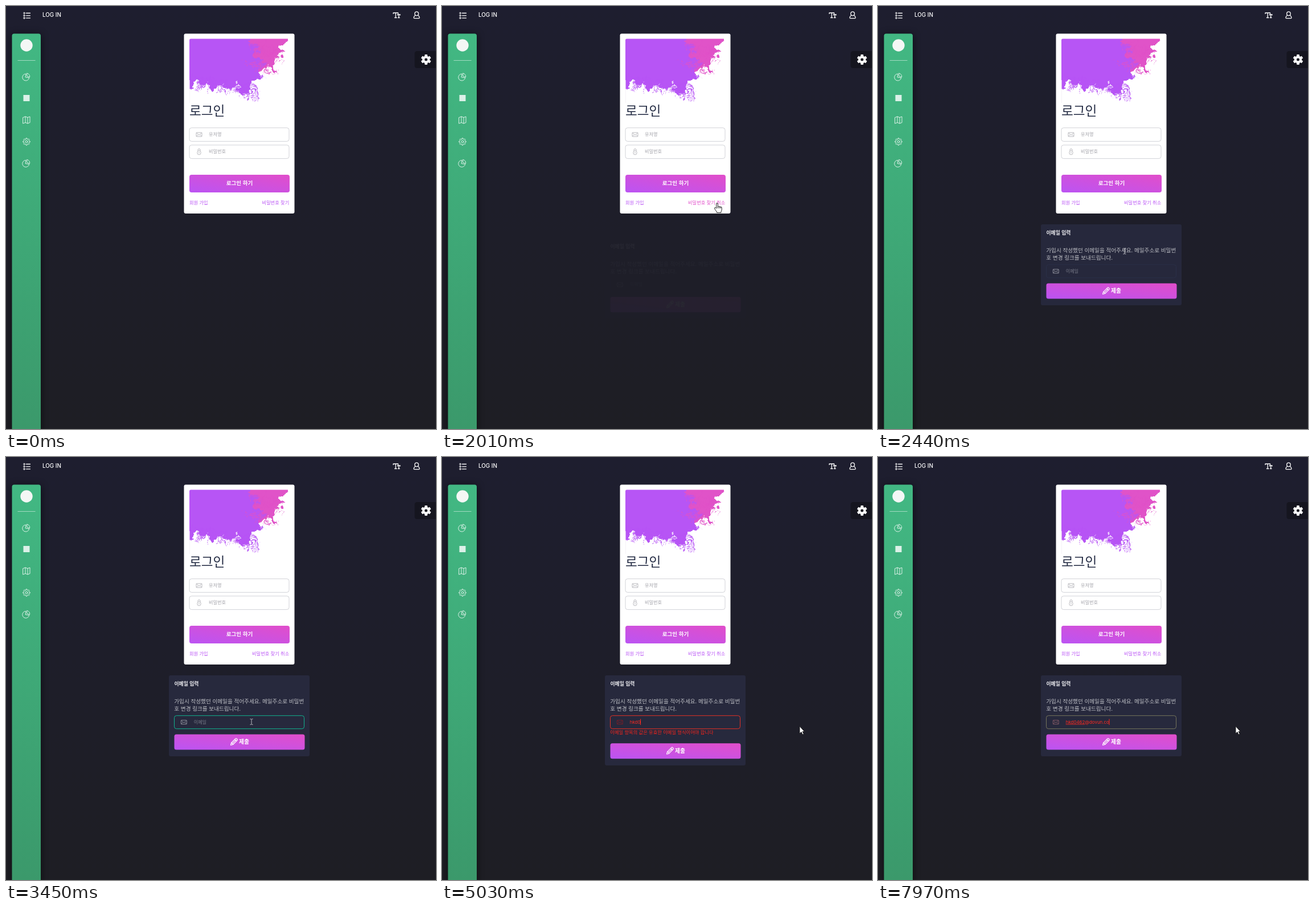
Recreate the animation shown at these times as an HTML page. Size 755 by 742 pixels, loop 8000 ms.

```html
<!DOCTYPE html>
<html lang="ko">
<head>
<meta charset="utf-8">
<title>로그인</title>
<style>
  html, body { margin: 0; width: 100%; height: 100%; overflow: hidden; background: #1e1e28; }
  svg { display: block; width: 755px; height: 742px; }
  text { font-family: "Noto Sans CJK KR", "Noto Sans CJK", "Noto Sans", sans-serif; font-weight: 300; }
  .latin { font-family: Inter, Roboto, sans-serif; font-weight: 400; }
  .bold { font-weight: 700; fill: #fff; }
  .line { fill: none; stroke: #fff; stroke-linecap: round; stroke-linejoin: round; }
</style>
</head>
<body>
<svg viewBox="0 0 755 742" xmlns="http://www.w3.org/2000/svg">
  <defs>
    <linearGradient id="page" x2="0" y2="1"><stop stop-color="#1e1e2f"/><stop offset="1" stop-color="#1e1e24"/></linearGradient>
    <linearGradient id="green" x2="0" y2="1"><stop stop-color="#42b883"/><stop offset="1" stop-color="#3b996b"/></linearGradient>
    <linearGradient id="primary" x1="1" y1="0" x2="0" y2="1"><stop stop-color="#e14eca"/><stop offset="1" stop-color="#bb54f3"/></linearGradient>
    <filter id="shade" x="-100%" width="300%" y="-10%" height="120%"><feGaussianBlur stdDeviation="7"/></filter>
    <filter id="ragged" filterUnits="userSpaceOnUse" x="290" y="20" width="230" height="170">
      <feTurbulence type="fractalNoise" baseFrequency=".09" numOctaves="4" seed="8"/>
      <feDisplacementMap in="SourceGraphic" scale="22" xChannelSelector="R" yChannelSelector="G"/>
    </filter>
    <clipPath id="picture"><path d="M322 170V60q0-2.5 2.500-2.500H497V170z"/></clipPath>
    <g id="pie" class="line"><path d="M-1-5A6 6 0 1 0 5.200 2L-1 1z"/><path d="M1.500-6A5.500 5.500 0 0 1 6 1L1.500-1z"/></g>
    <g id="mail" fill="none"><rect x="-5" y="-3.500" width="10" height="7" rx=".8"/><path d="M-4.500-3L0 1l4.500-4M-4.500 3l3-3M4.500 3l-3-3"/></g>
  </defs>

  <rect width="755" height="742" fill="url(#page)"/>

  <!-- top bar -->
  <g class="line" stroke-width="1.300">
    <path d="M35.500 12.500h7M35.500 16.800h7M35.500 21.100h7"/>
    <g stroke-width="1"><circle cx="32" cy="12.500" r="1.300"/><circle cx="32" cy="16.800" r="1.300"/><circle cx="32" cy="21.100" r="1.300"/></g>
    <path d="M680 13.500V12h8.500v1.500M684.200 12v8.500M682.500 20.500h3.500M687.500 16v-1h4.500v1M689.700 15v5.500M688.500 20.500h2.500"/>
    <circle cx="721" cy="13.500" r="3.300"/>
    <path d="M718.500 16.500q-2.500 1.500-2.500 4 0 1.200 1.500 1.200h7q1.500 0 1.500-1.200 0-2.500-2.500-4"/>
  </g>
  <text class="latin" x="64" y="19.200" font-size="9.800" fill="#fff" style="font-weight:500">LOG IN</text>

  <!-- sidebar -->
  <rect x="10.500" y="50" width="50.500" height="720" filter="url(#shade)" opacity=".55"/>
  <path d="M10.500 742V52.500q0-4 4-4H57q4 0 4 4V742z" fill="url(#green)"/>
  <circle cx="36" cy="69" r="10.700" fill="#f4f7f5"/>
  <path d="M20.500 95.500h31" stroke="#fff" opacity=".5"/>
  <g opacity=".82">
    <use href="#pie" x="35.500" y="124"/>
    <rect x="30.500" y="156" width="11" height="11" fill="#fff"/>
    <path class="line" d="M30 195.500l4-1.500 4 1.500 4-1.500v10.500l-4 1.500-4-1.500-4 1.500zM34 194v10.500M38 195.500V206"/>
    <g class="line" transform="translate(36 238)"><path id="gearLine"/><circle r="2"/></g>
    <use href="#pie" x="35.500" y="275.500"/>
  </g>

  <!-- settings tab -->
  <path d="M755 79h-33q-4.500 0-4.500 4.500v21q0 4.500 4.500 4.500h33z" fill="#15151f"/>
  <path id="gearSolid" transform="translate(737.500 94)" fill="#fff" fill-rule="evenodd" stroke="#fff" stroke-linejoin="round"/>

  <!-- login card -->
  <rect x="312.500" y="48.500" width="194" height="315.500" rx="3" fill="#fff"/>
  <g clip-path="url(#picture)">
    <g id="ink" filter="url(#ragged)" fill="none" stroke-linecap="round">
      <path fill="#e052c8" d="M405 30H482L495 62 482 74 492 84 470 92 476 118 460 104 442 120 410 95z"/>
      <path fill="#b754f5" d="M280 20H420L424 62 448 74 434 88 456 100 442 112 452 126 428 130 434 150 416 156 406 136 392 148 380 138 366 148 352 132 340 138 331 128 326 146 280 130z"/>
    </g>
  </g>
  <path d="M322.500 130v40" stroke="#eeeaf2" stroke-width=".6"/>
  <text x="322" y="192" font-size="22.600" fill="#222a42" style="font-weight:100">로그인</text>
  <g fill="none" stroke="#d2d3d8">
    <rect x="322" y="213.700" width="175" height="23.700" rx="3.800"/>
    <rect x="322" y="243.900" width="175" height="23.700" rx="3.800"/>
  </g>
  <g stroke="#a8a8ae" stroke-width=".8" fill="none">
    <use href="#mail" x="339" y="225.500"/>
    <path d="M337 254v-1.500a2 2 0 0 1 4 0V254M339 256v2.500"/><ellipse cx="339" cy="257.300" rx="3.200" ry="3.600"/>
  </g>
  <g font-size="8.200" fill="#a3a3aa"><text x="356" y="228">유저명</text><text x="356" y="258">비밀번호</text></g>
  <rect x="322" y="296" width="176" height="31" rx="3.800" fill="url(#primary)"/>
  <text class="bold" x="410" y="314" font-size="9.500" text-anchor="middle">로그인 하기</text>
  <g font-size="8.250" fill="#ba54f5">
    <text x="322" y="348">회원 가입</text>
    <text id="findLink" x="497.300" y="348" text-anchor="end"></text>
  </g>

  <!-- e-mail panel -->
  <g id="panel">
    <rect id="panelBack" x="286" y="383" width="247" rx="3" fill="#27293d"/>
    <text class="bold" x="295.500" y="401.300" font-size="8.800" style="fill:#f0f0f4">이메일 입력</text>
    <g font-size="9.600" fill="#bfc0c6">
      <text x="295.300" y="432">가입시 작성했던 이메일을 적어주세요. 메일주소로 비밀번</text>
      <text x="295.300" y="445.300">호 변경 링크를 보내드립니다.</text>
    </g>
    <rect id="field" x="295.500" y="453.700" width="228" height="23" rx="3.800" fill="none"/>
    <use id="fieldIcon" href="#mail" x="312.300" y="465.200" stroke-width=".9"/>
    <text id="hint" x="329.700" y="467.500" font-size="8.100" fill="#777a88">이메일</text>
    <text id="typed" class="latin" x="329.700" y="467.600" font-size="7.950" fill="#ff2a20"></text>
    <path id="spelling" stroke="#ff2a20" stroke-width=".8"/>
    <rect id="caret" y="459.500" width="1" height="10.500"/>
    <text id="error" x="295.300" y="486.300" font-size="8.270" fill="#f8241c" style="font-weight:400">이메일 항목의 값은 유효한 이메일 형식이어야 합니다</text>
    <g id="submit">
      <rect x="295.500" y="486.500" width="229" height="27" rx="3.500" fill="url(#primary)"/>
      <path class="line" stroke-width="1.100" d="M394.500 505.500l1-4 7.500-7.500q1-1 2 0l1 1q1 1 0 2l-7.500 7.500zM396 501.500l2.500 2.500M397.300 502.700l6.700-6.700M401.500 495.500l3 3"/>
      <text class="bold" x="409" y="503" font-size="9.700">제출</text>
    </g>
  </g>

  <!-- pointers, hot spot at the origin -->
  <path id="arrow" d="M0 0V12.500L3 9.800 5 14.300 7 13.400 5 9H8.300z" fill="#fff" stroke="#111" stroke-width=".7"/>
  <g id="hand" fill="#fff" stroke="#111" stroke-width=".9" stroke-linejoin="round">
    <path d="M-1.300 9V1q0-1.300 1.300-1.300T1.300 1V6q1-1.200 2.600 0 1.200-.8 2.300.4 2-.5 2 1.600V11q0 2-1.200 3.500V16.500H-.5V15Q-3 12-4.500 9.500-5 7.500-3.200 7.500z"/>
    <path d="M1.300 6v3M3.900 6v3M6.200 6.500V9"/>
  </g>
  <path id="beam" d="M-2.500-5Q0-5 0-4Q0-5 2.500-5M0-4V4M-2.500 5Q0 5 0 4Q0 5 2.500 5" fill="none" stroke="#c9c9cf" stroke-width=".9"/>
</svg>
<script>
const LOOP = 8000;
const ADDRESS = 'hkd0462@dovun.co';
const NAME_LENGTH = 7;
const KEY_TIMES = [4550, 4760, 4900, 5030, 5160, 5230, 5430, 6490,
  7110, 7225, 7335, 7450, 7560, 7675, 7785, 7895];
const CLICK_LINK = 1880, FOCUS = 2900, INVALID = KEY_TIMES[0], VALID = KEY_TIMES[15];
const CARET_TOGGLES = [2920, 3450, 3930, 4480, 4550, 5960, 6490, 6970, 7110];

const $ = id => document.getElementById(id);
const set = (id, attrs) => { for (const k in attrs) $(id).setAttribute(k, attrs[k]); };
const show = (id, on) => set(id, { visibility: on ? 'inherit' : 'hidden' });
const clamp = v => Math.max(0, Math.min(1, v));
const mix = (a, b, p) => a + (b - a) * p;
const smooth = p => p * p * (3 - 2 * p);

// CSS "ease": solve the x curve by bisection, then read y.
function ease(p) {
  const bezier = (s, a, b) => 3 * s * (1 - s) ** 2 * a + 3 * s * s * (1 - s) * b + s ** 3;
  let lo = 0, hi = 1;
  for (let i = 0; i < 20; i++) {
    const mid = (lo + hi) / 2;
    if (bezier(mid, .25, .25) < p) lo = mid; else hi = mid;
  }
  return bezier(lo, .1, 1);
}

function gear(teeth, outer, inner) {
  const points = [];
  for (let i = 0; i < teeth; i++) {
    for (const [offset, r] of [[-.32, inner], [-.2, outer], [.2, outer], [.32, inner]]) {
      const a = (i + offset) / teeth * 2 * Math.PI;
      points.push((r * Math.sin(a)).toFixed(2) + ' ' + (-r * Math.cos(a)).toFixed(2));
    }
  }
  return 'M' + points.join('L') + 'z';
}

function growInk() {
  let seed = 17;
  const random = () => (seed = seed * 16807 % 2147483647) / 2147483647;
  const strand = (x, y, dx, dy, color) => {
    const path = document.createElementNS('http://www.w3.org/2000/svg', 'path');
    const bend = (random() - .5) * 18;
    path.setAttribute('d', `M${x} ${y}q${bend} ${dy * .4} ${dx} ${dy}`);
    path.setAttribute('stroke', color);
    path.setAttribute('stroke-width', .5 + random() * 1.8);
    path.setAttribute('opacity', .35 + random() * .6);
    $('ink').append(path);
  };
  for (let i = 0; i < 70; i++) {
    const x = 325 + random() * 115;
    strand(x, 122 + (x - 325) * .15, (random() - .4) * 16, 8 + random() * 22, '#b754f5');
  }
  for (let i = 0; i < 60; i++) {
    strand(425 + random() * 50, 62 + random() * 45, (random() - .3) * 26, (random() - .4) * 24, '#e052c8');
  }
}

// Blends a list of [start, colour] stages, each reached 250 ms after its start.
function stagedColor(t, stages) {
  let color = stages[0][1];
  for (const [start, next] of stages.slice(1)) {
    const p = ease(clamp((t - start) / 250));
    color = color.map((c, i) => mix(c, next[i], p));
  }
  return `rgb(${color.map(Math.round)})`;
}

const MOVES = [
  { from: 620, to: 1420, path: [[752, 738], [610, 470], [483, 346]] },
  { from: 2080, to: 2640, path: [[483, 346], [425, 405], [431, 464.5]] },
  { from: 3450, to: 3660, path: [[431, 464.5], [550, 462], [628, 472.5]] },
];

function pointerAt(t) {
  const move = MOVES.filter(m => t >= m.from).pop() || MOVES[0];
  const p = smooth(clamp((t - move.from) / (move.to - move.from)));
  const [a, b, c] = move.path;
  return [0, 1].map(i => mix(mix(a[i], b[i], p), mix(b[i], c[i], p), p));
}

function drawPointer(t) {
  const [x, y] = pointerAt(t);
  const linkLeft = t < CLICK_LINK ? 450 : 432;
  const overLink = x > linkLeft && x < 497 && y > 339 && y < 351;
  const overText = t > 2300 && x < 524 && y > 422;
  const kind = overLink ? 'hand' : overText ? 'beam' : 'arrow';
  for (const id of ['arrow', 'hand', 'beam']) {
    show(id, t >= 650 && id === kind);
    set(id, { transform: `translate(${x.toFixed(2)} ${y.toFixed(2)})` });
  }
  $('findLink').textContent = t < CLICK_LINK ? '비밀번호 찾기' : '비밀번호 찾기 취소';
  set('findLink', { fill: t >= 650 && overLink ? '#e14eca' : '#ba54f5' });
}

function drawPanel(t) {
  const entry = ease(clamp((t - 1980) / 500));
  show('panel', entry > 0);
  set('panel', { opacity: entry, transform: `translate(0 ${25 * (1 - entry)})` });

  const invalid = t >= INVALID && t < VALID;
  show('error', invalid);
  set('panelBack', { height: invalid ? 158 : 142 });
  set('submit', { transform: `translate(0 ${invalid ? 15.7 : 0})` });
  set('field', { stroke: stagedColor(t, [[0, [43, 48, 73]], [FOCUS, [16, 178, 142]],
    [INVALID, [226, 48, 36]], [VALID, [16, 178, 142]]]) });
  set('fieldIcon', { stroke: stagedColor(t, [[0, [150, 151, 162]], [INVALID, [125, 30, 40]],
    [VALID, [150, 151, 162]]]) });
}

function drawTyping(t) {
  const count = KEY_TIMES.filter(k => t >= k).length;
  const typed = $('typed');
  typed.textContent = ADDRESS.slice(0, count);
  show('hint', !count);
  const widthOf = n => n ? typed.getSubStringLength(0, n) : 0;
  show('caret', CARET_TOGGLES.filter(k => t >= k).length % 2);
  set('caret', { x: 329.3 + widthOf(count), fill: count ? '#ff2a20' : '#d0d0d8' });
  const marked = t >= 6420;
  show('spelling', marked);
  if (marked) set('spelling', { d: `M329.7 469h${widthOf(NAME_LENGTH)}` });
}

function render(t) {
  drawPointer(t);
  drawPanel(t);
  drawTyping(t);
}

set('gearLine', { d: gear(8, 6.2, 4.6) });
set('gearSolid', { d: gear(6, 8.6, 6.2) + 'M3 0A3 3 0 1 0-3 0A3 3 0 1 0 3 0z' });
growInk();

const start = performance.now();
function frame() {
  render((performance.now() - start) % LOOP);
  requestAnimationFrame(frame);
}
frame();
</script>
</body>
</html>
```
